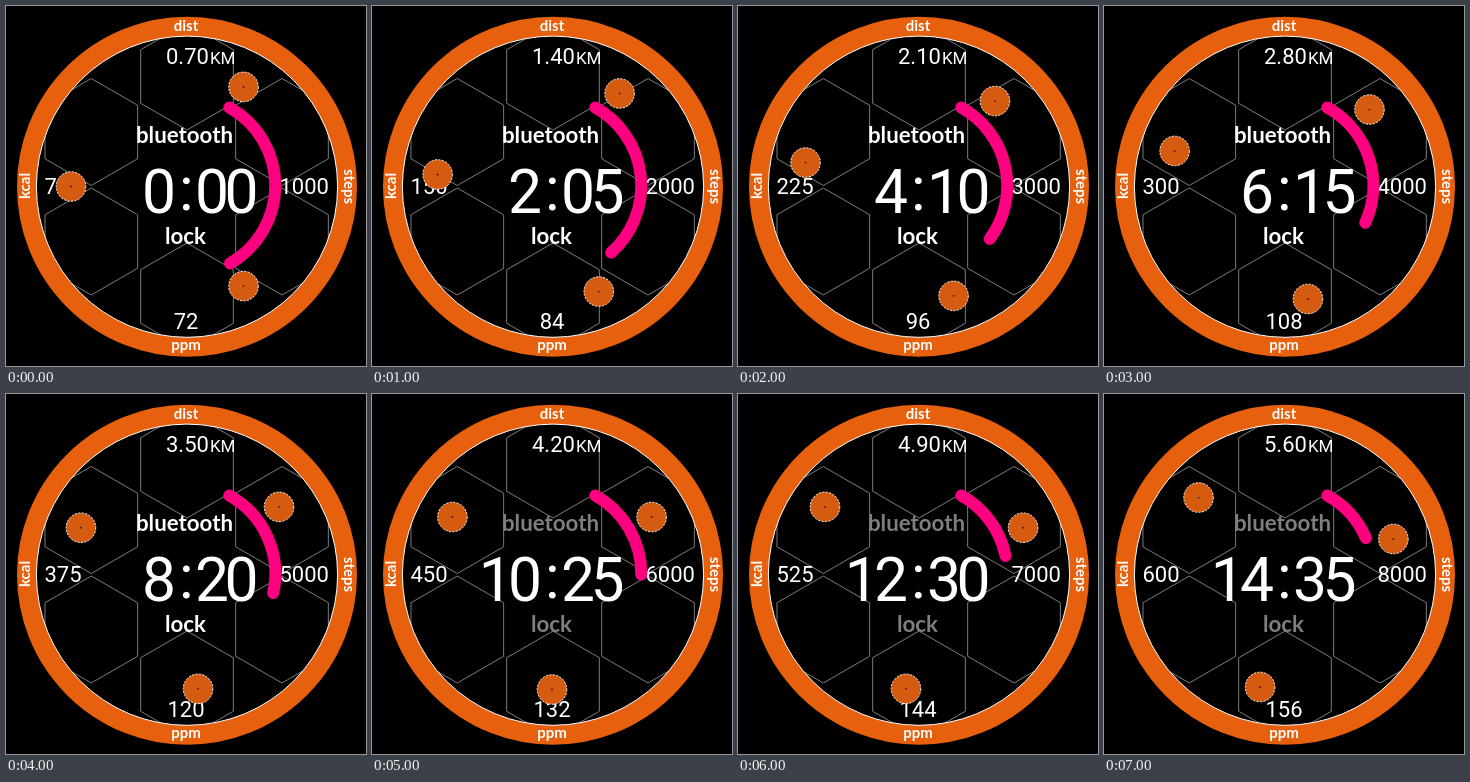
An HTML page that plays this animation: 360x360 px, repeating every 8 s.

```html
<!DOCTYPE html>
<html lang="en">
<head>
<meta charset="utf-8">
<title>Watch face</title>
<style>
  html, body { margin: 0; width: 100%; height: 100%; overflow: hidden; background: #000; }
  svg { display: block; width: 100vw; height: 100vh; }
  text { fill: #fff; }
  .num { font: 22px Roboto, sans-serif; }
  .time { font: 60.5px Roboto, sans-serif; letter-spacing: -4.6px; }
  .label { font: bold 22.3px Lato, sans-serif; text-anchor: middle; }
  .rim { font: bold 15px Lato, sans-serif; text-anchor: middle; }
  .unit { font-size: 17px; }
  .mid { text-anchor: middle; }
  .end { text-anchor: end; }
</style>
</head>
<body>
<svg viewBox="0 0 360 360">
  <rect width="360" height="360" fill="#000"/>
  <clipPath id="dial"><circle cx="181" cy="180.7" r="151"/></clipPath>
  <path id="cells" clip-path="url(#dial)" fill="none" stroke="#7c7c7c"/>
  <circle cx="181" cy="180.7" r="160.3" fill="none" stroke="#e6600e" stroke-width="19.4"/>
  <circle cx="181" cy="180.7" r="150.6" fill="none" stroke="#fff"/>

  <text class="rim" x="180" y="24.5">dist</text>
  <text class="rim" x="180" y="344">ppm</text>
  <text class="rim" transform="translate(24 180) rotate(-90)">kcal</text>
  <text class="rim" transform="translate(338 180.5) rotate(90)">steps</text>

  <text class="num" x="160" y="57.5"><tspan id="dist"></tspan><tspan class="unit" dx="1">KM</tspan></text>
  <text class="num" id="kcal" x="38.5" y="188"></text>
  <text class="num" id="steps" x="273.5" y="188"></text>
  <text class="num mid" id="ppm" x="180" y="322.5"></text>

  <text class="time end" id="hour" x="165.5" y="206.5"></text>
  <text class="time mid" x="178" y="204">:</text>
  <text class="time" id="minute" x="189" y="206.5"></text>

  <text class="label" id="bluetooth" x="178.5" y="137">bluetooth</text>
  <text class="label" id="lock" x="179.5" y="238">lock</text>

  <path id="arc" fill="none" stroke="#ff0080" stroke-width="12" stroke-linecap="round"/>
  <g id="balls"></g>
</svg>
<script>
  const STEP = 1000, COUNT = 8;
  const $ = id => document.getElementById(id);

  function polar(r, deg, cx = 180, cy = 180.5) {
    const a = deg * Math.PI / 180;
    return [cx + r * Math.cos(a), cy + r * Math.sin(a)].map(v => +v.toFixed(2));
  }

  function hexagon([cx, cy]) {
    const pts = [0, 1, 2, 3, 4, 5].map(i => polar(53.5, 60 * i - 90, cx, cy).join());
    return "M" + pts.join("L") + "Z";
  }
  const centres = [[181, 70.5], [181, 290.5], [85.3, 126], [85.3, 235.5], [276, 126], [276, 235.5]];
  $("cells").setAttribute("d", centres.map(hexagon).join(""));

  const ball = `<g><circle r="14.8" fill="#d55b10"/>
    <circle r="14.8" fill="none" stroke="#fff" stroke-width=".9" stroke-dasharray="2.2 1.3"/>
    <circle r=".9" fill="#3a1a08"/></g>`;
  $("balls").innerHTML = ball.repeat(3);
  const balls = [...$("balls").children];

  function show(k) {
    $("dist").textContent = (0.7 * (k + 1)).toFixed(2);
    $("kcal").textContent = 75 * (k + 1);
    $("steps").textContent = 1000 * (k + 1);
    $("ppm").textContent = 72 + 12 * k;
    $("hour").textContent = 2 * k;
    $("minute").textContent = String(5 * k).padStart(2, "0");

    const ink = k < 5 ? "#fff" : "#7f7f7f";
    $("bluetooth").style.fill = $("lock").style.fill = ink;

    const from = polar(89.3, -61, 180, 179.7), to = polar(89.3, 60.5 - 12 * k, 180, 179.7);
    $("arc").setAttribute("d", `M${from}A89.3 89.3 0 0 1 ${to}`);

    balls.forEach((b, i) =>
      b.setAttribute("transform", `translate(${polar(115, 120 * i - 60 + 6 * k)})`));
  }

  let shown = -1;
  const start = performance.now();
  function tick() {
    const k = Math.floor((performance.now() - start) / STEP) % COUNT;
    if (k !== shown) show(shown = k);
    requestAnimationFrame(tick);
  }
  tick();
</script>
</body>
</html>
```
